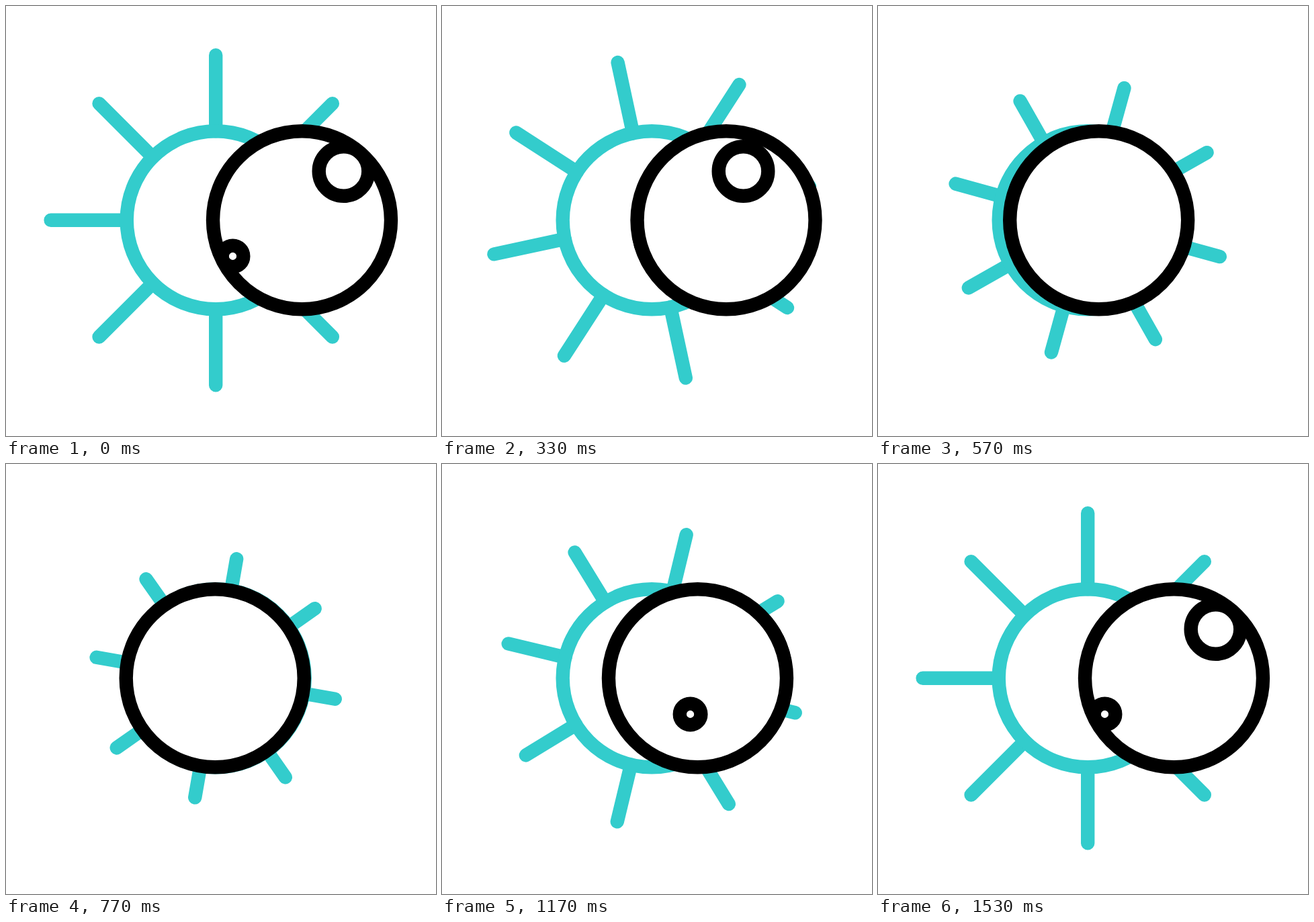
An HTML page that plays this animation: 640 px wide and 640 px high, repeating every 1670 ms.

```html
<!DOCTYPE html>
<html lang="en">
<head>
<meta charset="utf-8">
<title>Eclipse</title>
<style>
  html, body { margin: 0; width: 100%; height: 100%; overflow: hidden; background: #fff; }
  svg { display: block; width: 100vw; height: 100vh; }
  circle, path { fill: none; stroke-width: 20.4; stroke-linecap: round; }
  .sun { stroke: #3cc; }
  .moon { stroke: #000; }
  .moon.disc { fill: #fff; }
</style>
</head>
<body>
<svg viewBox="0 0 640 640">
  <clipPath id="edge"><circle r="142.5"/></clipPath>
  <g transform="translate(312.2 318.8)">
    <path id="rays" class="sun"/>
    <circle class="sun" r="132.5"/>
  </g>
  <g id="moon">
    <circle class="moon disc" r="132.5"/>
    <g clip-path="url(#edge)">
      <g id="craters">
        <circle class="moon" cx="62" cy="-72.8" r="36.8"/>
        <circle class="moon" cx="-103" cy="53.6" r="15.8"/>
      </g>
    </g>
  </g>
</svg>
<script>
const LOOP = 1670, STEP = 100 / 3;
const [rays, moon, craters] = ['rays', 'moon', 'craters'].map(id => document.getElementById(id));

// Smooth progress from 0 to 1 between two steps.
function ease(step, from, to) {
  const t = Math.min(1, Math.max(0, (step - from) / (to - from)));
  return t * t * (3 - 2 * t);
}

function rayPath(length) {
  let d = '';
  for (let i = 0; i < 8; i++) {
    const x = Math.cos(i * Math.PI / 4), y = Math.sin(i * Math.PI / 4);
    d += `M${x * 132.5} ${y * 132.5}L${x * length} ${y * length}`;
  }
  return d;
}

function draw(ms) {
  const step = Math.floor((ms % LOOP + 5) / STEP);
  const turn = 30 * ease(step, 3.8, 18) + 60 * ease(step, 18.8, 42.2);
  const shrink = ease(step, 7, 24) - ease(step, 26.6, 41.3);
  const cover = ease(step, 7, 20) - ease(step, 28.4, 41);
  // Craters leave on the left and come back in from the right.
  const shift = step < 22 ? -270 * ease(step, 7, 20) : 256 * (1 - ease(step, 24, 42.5));

  rays.setAttribute('d', rayPath(245.6 - 66 * shrink));
  rays.setAttribute('transform', `rotate(${-turn})`);
  moon.setAttribute('transform', `translate(${440.5 - 129.3 * cover} 318.8)`);
  craters.setAttribute('transform', `translate(${shift} 0)`);
}

const start = performance.now();
function tick() {
  draw(performance.now() - start);
  requestAnimationFrame(tick);
}
tick();
</script>
</body>
</html>
```
